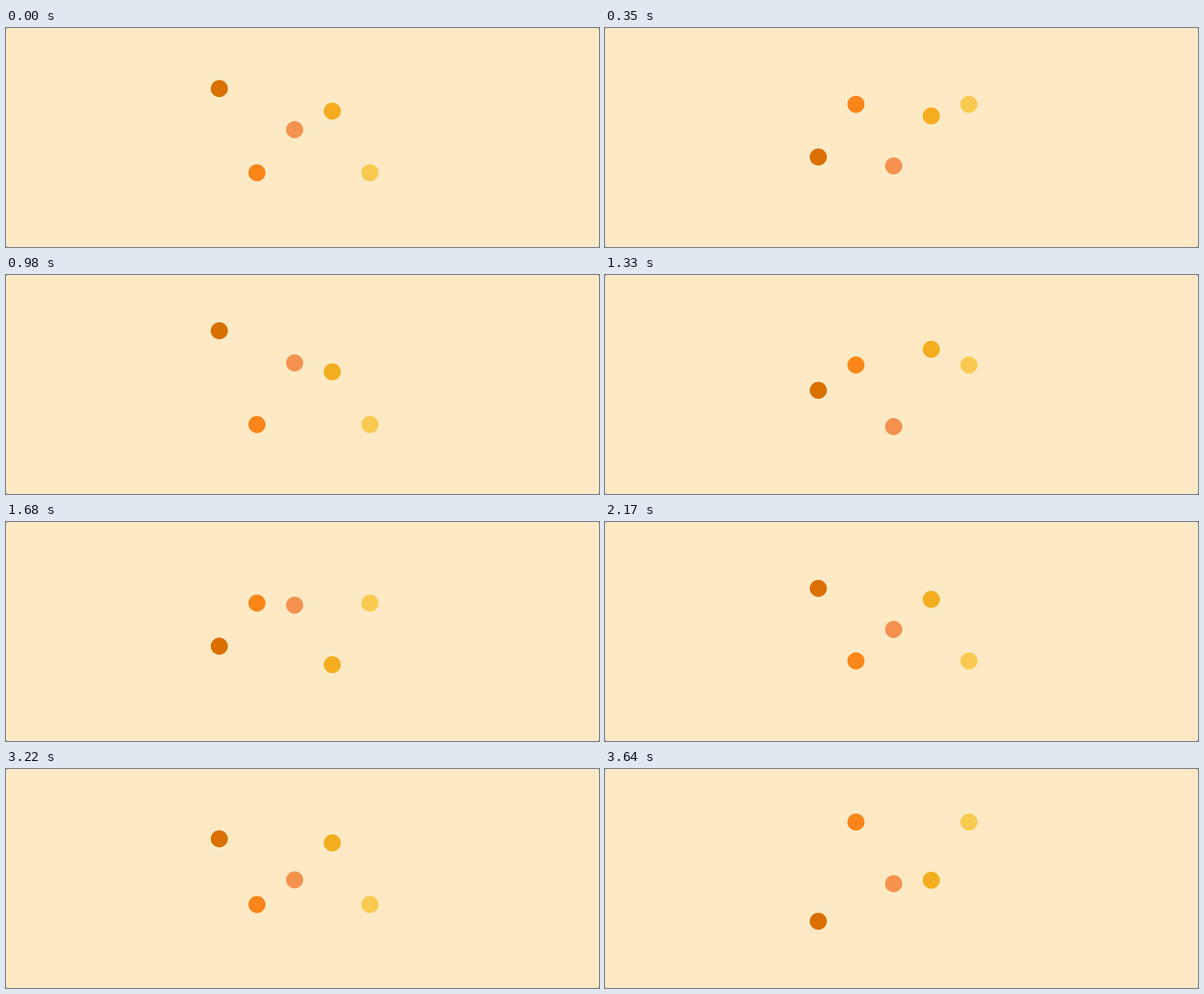
These frames come from a looping animation (866 px wide and 320 px high, 3.71 s). An HTML page:

```html
<!DOCTYPE html>
<html lang="en">
<head>
<meta charset="utf-8">
<title>Bouncing dots</title>
<style>
  html, body { margin: 0; width: 100%; height: 100%; overflow: hidden; background: #555; }
  svg { display: block; width: 866px; height: 320px; background: #fdeac5; border-radius: 2px; }
</style>
</head>
<body>
<svg viewBox="0 0 866 320">
  <circle cx="311.5" r="12.5" fill="#d97000"/>
  <circle cx="366.5" r="12.5" fill="#fa8519"/>
  <circle cx="421.5" r="12.5" fill="#f4924e"/>
  <circle cx="476.5" r="12.5" fill="#f3ad1f"/>
  <circle cx="531.5" r="12.5" fill="#f9ca50"/>
</svg>
<script>
  const LOOP = 3710, STEP = 70, TOP = 75, TRAVEL = 150;
  // Head start of each dot along its path, in px; a full bounce is 2 * TRAVEL.
  const leads = [0, 150, 60, 240, 150];
  // Distance covered over time: steady, with a short slowdown midway.
  const pace = [[0, 13.5], [1680, 493.5], [2170, 622], [2800, 806.5], [3640, 1047.5]];
  const dots = document.querySelectorAll('circle');

  function distance(t) {
    const i = Math.max(1, pace.findIndex(([end]) => t <= end));
    const [t0, d0] = pace[i - 1], [t1, d1] = pace[i];
    return d0 + (d1 - d0) * (t - t0) / (t1 - t0);
  }

  function bounce(d) {
    return TOP + TRAVEL - Math.abs(d % (2 * TRAVEL) - TRAVEL);
  }

  function draw(time) {
    const t = Math.floor((time % LOOP + 0.5) / STEP) * STEP % LOOP;
    const d = distance(t);
    dots.forEach((dot, i) => dot.setAttribute('cy', bounce(d + leads[i])));
  }

  const start = performance.now();
  function tick() {
    draw(performance.now() - start);
    requestAnimationFrame(tick);
  }
  tick();
</script>
</body>
</html>
```
